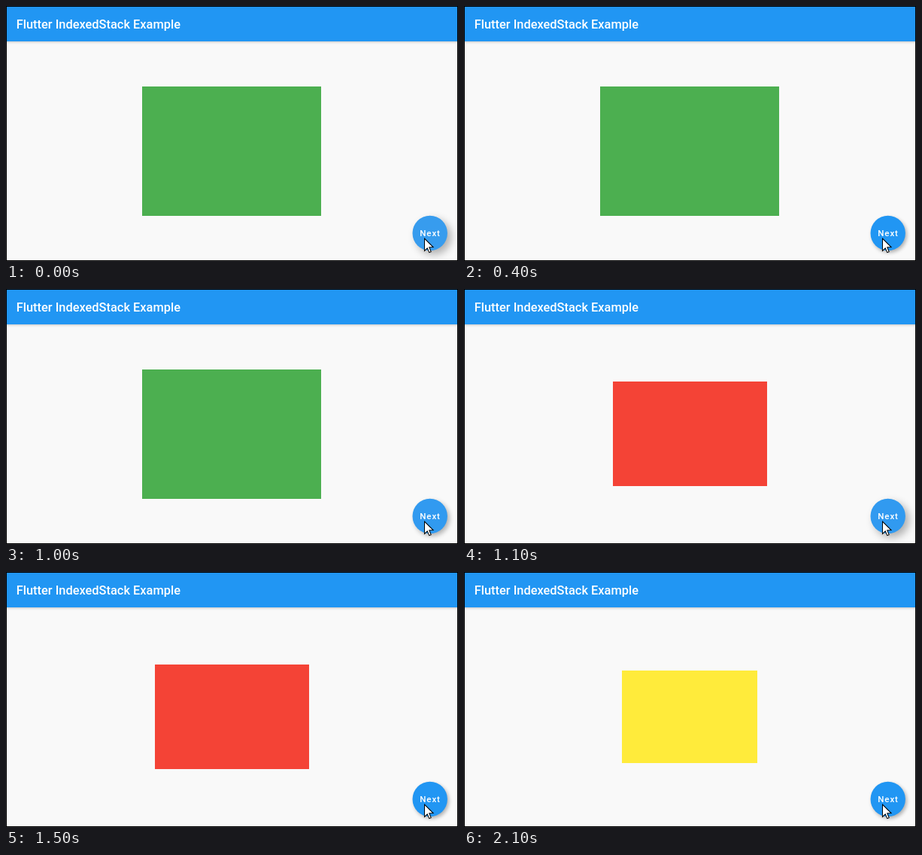
An HTML page with a canvas for the animation above (2.3 s loop, 601x339 px).

```html
<!DOCTYPE html>
<html lang="en">
<head>
<meta charset="utf-8">
<title>Indexed stack</title>
<style>
html, body { margin: 0; width: 100%; height: 100%; overflow: hidden; background: #f9f9f9; }
canvas { display: block; }
</style>
</head>
<body>
<canvas id="stage" width="601" height="339"></canvas>
<script>
const ctx = document.getElementById('stage').getContext('2d');
const W = 601, H = 339, LOOP = 2300, TICK = 100;
const DP = 0.82; // pixels per logical unit
const BLUE = '#2196f3';
const FONT = 'Roboto, "Noto Sans", sans-serif';

const cards = [
  { color: '#4caf50', w: 290, h: 210, from: 0 },
  { color: '#f44336', w: 250, h: 170, from: 1100 },
  { color: '#ffeb3b', w: 220, h: 150, from: 1900 }
];

// Eased 0..1 between two times
const ramp = (t, a, b) => Math.min(1, Math.max(0, (t - a) / (b - a))) ** 2;

// Rises from a to b, falls from c to d
const pulse = (t, a, b, c, d) => ramp(t, a, b) * (1 - ramp(t, c, d));

function shadow(alpha, blur, x, y) {
  ctx.shadowColor = `rgba(0,0,0,${alpha})`;
  ctx.shadowBlur = blur;
  ctx.shadowOffsetX = x;
  ctx.shadowOffsetY = y;
}

function label(text, x, y, size, spacing) {
  ctx.font = `500 ${size * DP}px ${FONT}`;
  ctx.letterSpacing = spacing * DP + 'px';
  ctx.fillStyle = '#fff';
  ctx.fillText(text, x, y);
}

function drawBar() {
  ctx.save();
  shadow(0.22, 3, 0, 1);
  ctx.fillStyle = BLUE;
  ctx.fillRect(-10, -10, W + 20, 57);
  ctx.restore();
  label('Flutter IndexedStack Example', 13.8, 30.3, 20, 0);
}

function drawCard({ color, w, h }) {
  const x = Math.round(300 - w * DP / 2), y = Math.round(192.8 - h * DP / 2);
  ctx.fillStyle = color;
  ctx.fillRect(x, y, Math.round(w * DP), Math.round(h * DP));
}

function drawButton(glow, lift) {
  const disc = () => {
    ctx.beginPath();
    ctx.arc(563.7, 302, 23.2, 0, Math.PI * 2);
    ctx.fill();
  };
  ctx.save();
  shadow(0.3, 5 + 6 * lift, 2 + 3 * lift, 2.5 + 2.5 * lift);
  ctx.fillStyle = BLUE;
  disc();
  ctx.restore();
  ctx.fillStyle = `rgba(245,205,190,${glow})`;
  disc();
  label('Next', 550.2, 306.3, 14, 1.15);
}

// Arrow mirrored about its own tilted axis
function drawCursor() {
  const half = [[6.3, 15], [1.4, 13.1], [1.3, 19.5]];
  const mirror = half.map(([x, y]) => [-x, y]).reverse();
  ctx.save();
  ctx.translate(556.5, 309.2);
  ctx.rotate(-Math.PI / 8);
  ctx.beginPath();
  ctx.moveTo(0, 0);
  for (const [x, y] of [...half, ...mirror]) ctx.lineTo(x, y);
  ctx.closePath();
  ctx.fillStyle = '#fff';
  ctx.fill();
  ctx.strokeStyle = '#000';
  ctx.lineWidth = 1;
  ctx.stroke();
  ctx.restore();
}

function draw(time) {
  const t = Math.floor(time % LOOP / TICK) * TICK;
  const card = cards.filter(c => c.from <= t).pop();
  const lift = pulse(t, -TICK, 0, 200, 400)
    + pulse(t, 900, 1100, 1100, 1300)
    + pulse(t, 1800, 1900, 1900, 2100);
  const glow = 0.1 * pulse(t, -TICK, 0, 200, 400)
    + 0.07 * pulse(t, 800, 1000, 1400, 1500);

  ctx.fillStyle = '#f9f9f9';
  ctx.fillRect(0, 0, W, H);
  drawCard(card);
  drawBar();
  drawButton(glow, lift);
  drawCursor();
  ctx.strokeStyle = '#000';
  ctx.lineWidth = 1;
  ctx.strokeRect(0.5, 0.5, W - 1, H - 1);
}

const start = performance.now();
function tick() {
  draw(performance.now() - start);
  requestAnimationFrame(tick);
}
tick();
</script>
</body>
</html>
```
